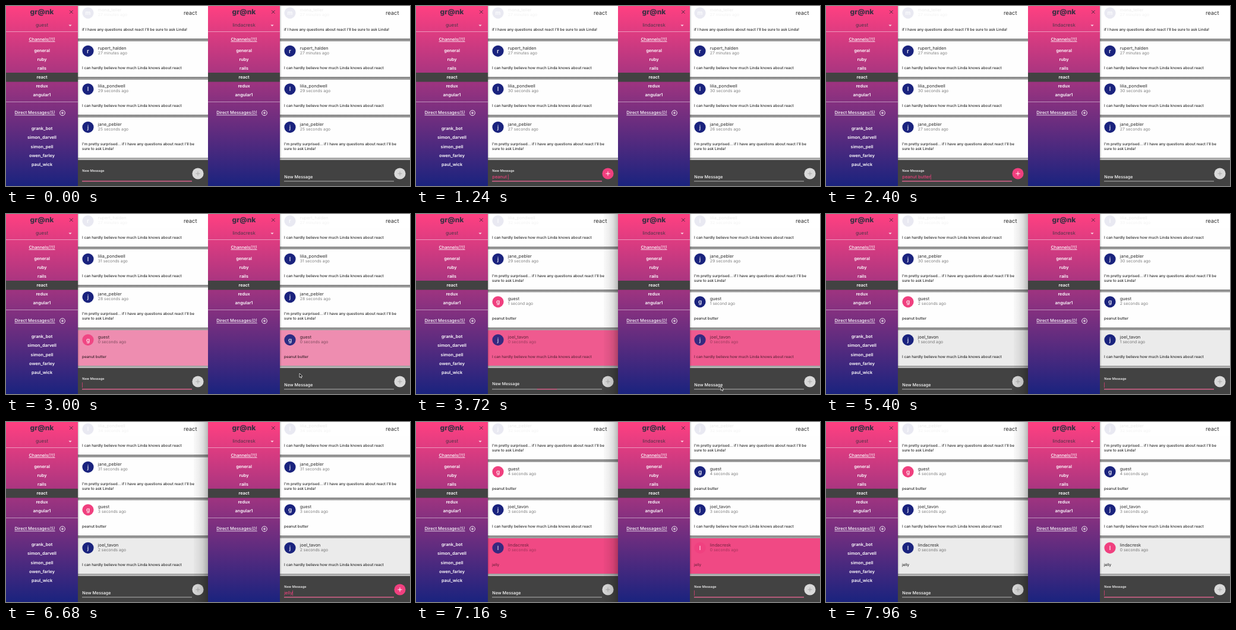
Animation of 680 by 305 pixels, one loop 8 s. Source, as an HTML page with a canvas:

```html
<!DOCTYPE html>
<html lang="en">
<head>
<meta charset="utf-8">
<title>Chat demo</title>
<style>
  html, body { margin: 0; width: 100%; height: 100%; overflow: hidden; background: #424242; }
  canvas { display: block; width: 680px; height: 305px; }
</style>
</head>
<body>
<canvas id="stage"></canvas>
<script>
const W = 680, H = 305, LOOP = 8000;
const PINK = '#ff4081', ROSE = '#f0407f', NAVY = '#1a237e', DARK = '#424242';
const INK = 'rgba(0,0,0,.84)', FADED_INK = 'rgba(0,0,0,.5)';
const GAP = 4.5, LIST_END = 257;
const SEND_A = 2640, BOT_POST = 3600, SEND_B = 7120;
const BLUR_A = 3540, FOCUS_B = 5000, FOCUS_TIME = 220, FADE = 800;

const canvas = document.getElementById('stage');
const ctx = canvas.getContext('2d');
const dpr = window.devicePixelRatio || 1;
canvas.width = W * dpr;
canvas.height = H * dpr;

const clamp = v => Math.max(0, Math.min(1, v));
const lerp = (a, b, k) => a + (b - a) * k;
const mix = (a, b, k) => `rgb(${a.map((v, i) => Math.round(lerp(v, b[i], k))).join(',')})`;

const CHANNELS = ['general', 'ruby', 'rails', 'react', 'redux', 'angular1'];
const CONTACTS = ['grank_bot', 'simon_darvell', 'simon_pell', 'owen_farley', 'paul_wick'];
const PRAISE = ['I can hardly believe how much Linda knows about react'];

// "age" gives seconds from the running clock; "at" is the arrival time
const MESSAGES = [
  { user: 'mona_teller', age: null, lines: ["if I have any questions about react I'll be sure to ask Linda!"] },
  { user: 'rupert_halden', age: null, lines: PRAISE },
  { user: 'lilia_pondwell', age: c => c + 3.6, lines: PRAISE },
  { user: 'jane_pebler', age: c => c, lines: [
    "I'm pretty surprised... if I have any questions about react I'll be", 'sure to ask Linda!'] },
  { user: 'guest', at: SEND_A, age: c => c - 28, lines: ['peanut butter'] },
  { user: 'joel_tavon', at: BOT_POST, age: c => c - 29, lines: PRAISE },
  { user: 'lindacresk', at: SEND_B, age: c => c - 32, lines: ['jelly'] }
];

function text(str, x, y, size, color, { weight = 400, align = 'left', style = '' } = {}) {
  ctx.font = `${style} ${weight} ${size}px Inter, Roboto, sans-serif`;
  ctx.textAlign = align;
  ctx.fillStyle = color;
  ctx.fillText(str, x, y);
  return ctx.measureText(str).width;
}

function rect(x, y, w, h, color) {
  ctx.fillStyle = color;
  ctx.fillRect(x, y, w, h);
}

function disc(x, y, r, color) {
  ctx.fillStyle = color;
  ctx.beginPath();
  ctx.arc(x, y, r, 0, Math.PI * 2);
  ctx.fill();
}

function gradient(x0, y0, x1, y1, ...colors) {
  const g = ctx.createLinearGradient(x0, y0, x1, y1);
  colors.forEach((c, i) => g.addColorStop(i / (colors.length - 1), c));
  return g;
}

function strokePath(points, color, width) {
  ctx.strokeStyle = color;
  ctx.lineWidth = width;
  ctx.beginPath();
  points.forEach(([x1, y1, x2, y2]) => { ctx.moveTo(x1, y1); ctx.lineTo(x2, y2); });
  ctx.stroke();
}

const plus = (x, y, r, color, width) =>
  strokePath([[x - r, y, x + r, y], [x, y - r, x, y + r]], color, width);

function countedHeading(label, count, cx, y) {
  const size = 7.3;
  ctx.font = `500 ${size}px Inter, Roboto, sans-serif`;
  const wide = ctx.measureText(label + count).width;
  const x = cx - wide / 2;
  const used = text(label, x, y, size, '#fff', { weight: 500 });
  text(count, x + used, y, size, '#fff', { style: 'italic' });
  rect(x, y + 1.2, wide, 0.8, '#fff');
}

function sidebar(user, contacts) {
  rect(0, 0, 121, H, gradient(0, 0, 0, H, PINK, NAVY));

  text('gr@nk', 60.5, 13.5, 12, '#3b3044', { weight: 800, align: 'center' });
  strokePath([[107, 7.3, 112.6, 12.9], [112.6, 7.3, 107, 12.9]], '#3b2a3a', 0.9);
  text(user, 60.5, 35.3, 8, '#4d3547', { align: 'center' });
  ctx.fillStyle = 'rgba(255,255,255,.75)';
  ctx.beginPath();
  ctx.moveTo(105.3, 31.7);
  ctx.lineTo(110.7, 31.7);
  ctx.lineTo(108, 34.5);
  ctx.fill();

  for (const y of [43, 162]) rect(0, y, 121, 0.8, 'rgba(255,255,255,.6)');
  rect(0, 113, 121, 15.5, DARK);

  const item = (name, y) => text(name, 60.5, y, 7.3, '#fff', { weight: 600, align: 'center' });
  countedHeading('Channels', '(11)', 60.5, 58.7);
  CHANNELS.forEach((name, i) => item(name, 77.7 + i * 15.1));
  countedHeading('Direct Messages', `(${contacts.length})`, 48.5, 183.3);
  ctx.strokeStyle = '#fff';
  ctx.lineWidth = 0.9;
  ctx.beginPath();
  ctx.arc(95, 181.2, 4.4, 0, Math.PI * 2);
  ctx.stroke();
  plus(95, 181.2, 2.3, '#fff', 0.9);
  contacts.forEach((name, i) => item(name, 210.3 + i * 15.1));
}

function ageLabel(message, clock) {
  if (!message.age) return '27 minutes ago';
  const s = Math.floor(message.age(clock));
  return `${s} second${s === 1 ? '' : 's'} ago`;
}

function card(message, top, height, t, clock, own, newest) {
  const live = message.at !== undefined && newest;
  const k = live ? clamp((t - message.at) / FADE) : 1;
  const bottom = top + height;
  rect(121, top, 219, height, live ? mix([240, 64, 127], [235, 235, 235], k) : '#fefefe');

  // the shadow below the last card falls on a lighter strip
  const tones = newest ? ['#9a9a9a', '#c8c8c8'] : ['#808080', '#a8a8a8'];
  rect(121, bottom, 219, GAP, gradient(0, bottom, 0, bottom + GAP, ...tones));

  ctx.globalAlpha = lerp(0.85, 1, k);
  disc(138, top + 16.3, 9.6, own ? ROSE : NAVY);
  text(message.user[0], 138, top + 19.6, 10, '#fff', { weight: 500, align: 'center' });

  ctx.globalAlpha = lerp(0.6, 1, clamp(k * 1.8));
  text(message.user, 154.8, top + 13.8, 7.3, INK);
  text(ageLabel(message, clock), 154.8, top + 21.5, 6.8, FADED_INK);
  message.lines.forEach((line, i) =>
    text(line, 128, top + 46.8 + i * 8, 6.35, INK, { weight: 500 }));
  ctx.globalAlpha = 1;
}

function feed(t, clock, user) {
  const shown = MESSAGES.filter(m => m.at === undefined || t >= m.at);
  let bottom = LIST_END;
  for (let i = shown.length - 1; i >= 0 && bottom > 0; i--) {
    const m = shown[i];
    const height = 60 + (m.lines.length - 1) * 8;
    card(m, bottom - height, height, t, clock, m.user === user, i === shown.length - 1);
    bottom -= height + GAP;
  }
  rect(121, 0, 219, 24, 'rgba(255,255,255,.9)');
  text('react', 321.5, 15.2, 9.4, '#333', { align: 'right' });
  rect(121, 0, 3, 261, gradient(121, 0, 124, 0, 'rgba(0,0,0,.2)', 'rgba(0,0,0,0)'));
}

function composer({ focus, typed, caret }) {
  rect(121, 261, 219, 44, DARK);
  text('New Message', 128.3, lerp(291.8, 280.8, focus), lerp(7.1, 5.5, focus), '#fff', { weight: 500 });

  rect(128, 296.5, 185, 0.8, '#d0d0d0');
  const half = 92.5 * focus;
  rect(220.5 - half, 296.3, half * 2, 1, ROSE);

  const width = text(typed, 128.3, 292, 7.5, PINK);
  if (caret) rect(128.2 + width, 285.3, 0.7, 9, ROSE);

  disc(323, 284, 9.6, typed ? ROSE : '#d9d9d9');
  plus(323, 284, 3.6, typed ? '#fff' : '#a9a9a9', 1);
}

// The "seconds ago" labels refresh on re-render, not on an even beat
function clockAt(t, left) {
  const ticks = [[0, 25.5], [700, 26.5], [left ? 1200 : 1700, 27.2], [SEND_A, 28.2],
    [BOT_POST, 29.2], [4600, 30.2], [6100, 31.2], [SEND_B, 32.2]];
  return ticks.filter(([at]) => t >= at).pop()[1];
}

const typing = (str, t, start, step, end) =>
  t < end ? str.slice(0, Math.max(0, Math.floor((t - start) / step))) : '';
const blink = (t, base) => (t - base + 10600) % 1060 < 530;

function guestComposer(t) {
  const typed = typing('peanut butter', t, 400, 120, SEND_A);
  const base = t < 400 ? 530 : t < 1960 ? t : t < SEND_A ? 1960 : SEND_A;
  return {
    typed,
    focus: 1 - clamp((t - BLUR_A) / FOCUS_TIME),
    caret: t < BLUR_A && blink(t, base)
  };
}

function hostComposer(t) {
  const typed = typing('jelly', t, 6000, 130, SEND_B);
  const base = t < 6000 ? FOCUS_B : t < SEND_B ? t : 6880;
  return {
    typed,
    focus: clamp((t - FOCUS_B) / FOCUS_TIME),
    caret: t >= FOCUS_B && blink(t, base)
  };
}

function pane(x, t, user, contacts, input) {
  ctx.save();
  ctx.translate(x, 0);
  ctx.beginPath();
  ctx.rect(0, 0, 340, H);
  ctx.clip();
  feed(t, clockAt(t, x === 0), user);
  composer(input);
  sidebar(user, contacts);
  ctx.restore();
}

// Once the right window is active, its shadow falls on the left one
function windowShadow(t) {
  if (t < BLUR_A) return;
  rect(316, 0, 24, H, gradient(316, 0, 340, 0,
    'rgba(0,0,0,.02)', 'rgba(0,0,0,.06)', 'rgba(0,0,0,.13)', 'rgba(0,0,0,.28)'));
}

function pointer(t) {
  if (t < 2700 || t > 4800) return;
  const a = clamp((t - 2700) / 300), b = clamp((t - 3000) / 600);
  const x = 470 + 24 * a + 19 * b, y = 246 + 24 * a + 22 * b;
  const shape = [[0, 0], [0, 7], [1.6, 5.5], [2.7, 8], [3.8, 7.5], [2.8, 5.1], [5, 5]];
  ctx.beginPath();
  shape.forEach(([dx, dy]) => ctx.lineTo(x + dx, y + dy));
  ctx.closePath();
  ctx.fillStyle = '#111';
  ctx.strokeStyle = '#eee';
  ctx.lineWidth = 0.8;
  ctx.fill();
  ctx.stroke();
}

function draw(now) {
  const t = now % LOOP;
  ctx.setTransform(dpr, 0, 0, dpr, 0, 0);
  ctx.textRendering = 'geometricPrecision';
  pane(0, t, 'guest', CONTACTS, guestComposer(t));
  windowShadow(t);
  pane(340, t, 'lindacresk', [], hostComposer(t));
  pointer(t);
}

let start;
function frame(now) {
  if (start === undefined) start = now;
  draw(now - start);
  requestAnimationFrame(frame);
}
requestAnimationFrame(frame);
</script>
</body>
</html>
```
